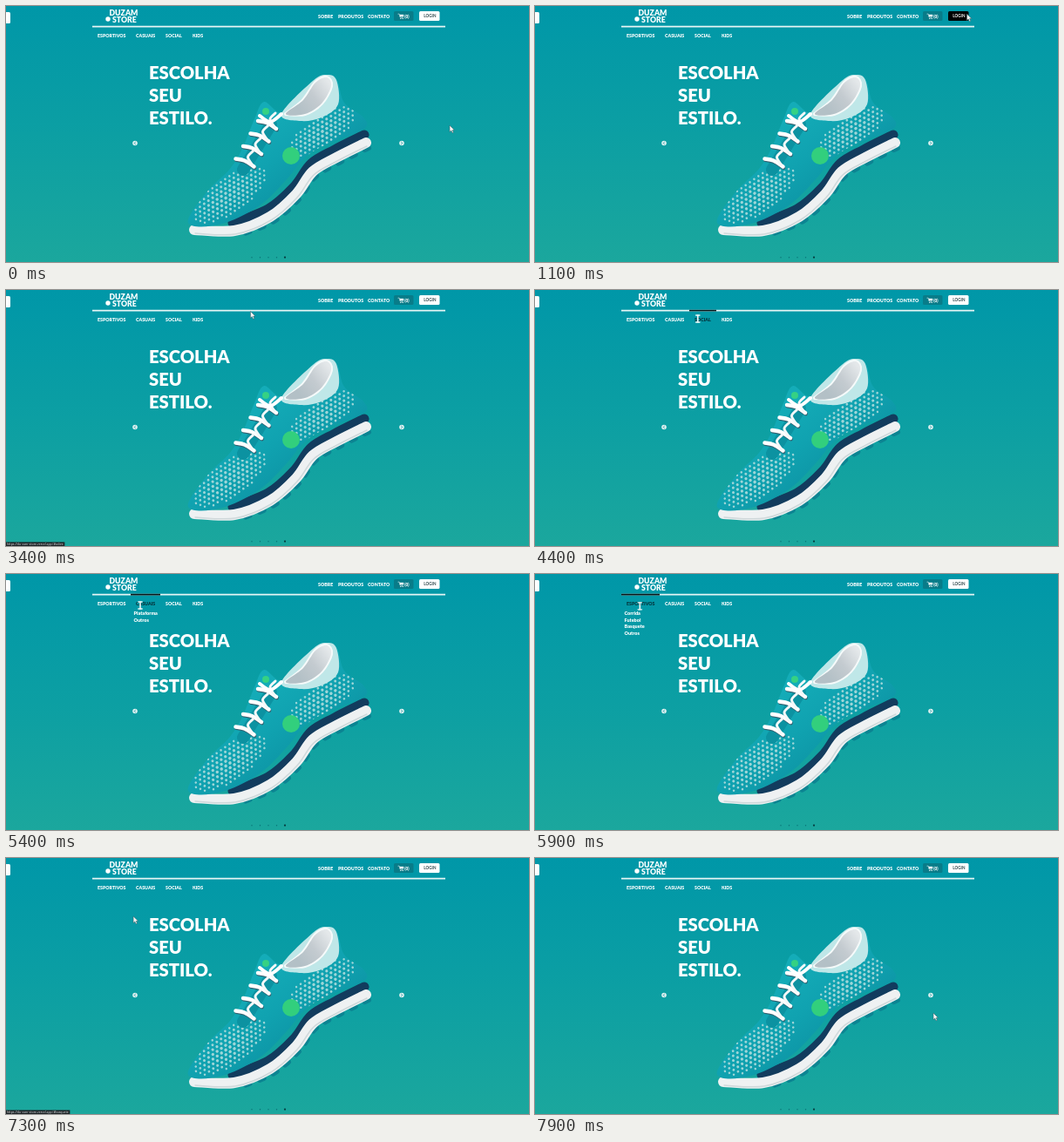
Animation, 600 px wide and 294 px high, one loop 8 s. Source, as an HTML page with a canvas:

```html
<!DOCTYPE html>
<html lang="pt">
<head>
<meta charset="utf-8">
<title>Loja de calçados</title>
<style>
html, body { margin: 0; width: 100%; height: 100%; overflow: hidden; background: #0d9fa3; }
canvas { display: block; width: 600px; height: 294px; }
</style>
</head>
<body>
<canvas id="stage"></canvas>
<script>
const W = 600, H = 294, LOOP = 8000, STEP = 100;
const FONT = 'Lato, Inter, sans-serif';
const dpr = window.devicePixelRatio || 1;
const stage = document.getElementById('stage');
const backdrop = document.createElement('canvas');

function setup(canvas) {
  canvas.width = W * dpr;
  canvas.height = H * dpr;
  const c = canvas.getContext('2d');
  c.scale(dpr, dpr);
  return c;
}
const view = setup(stage);
let g = setup(backdrop);

// Smooth curve through points given as a flat list.
function spline(flat, closed) {
  const n = flat.length / 2;
  const at = i => {
    const k = closed ? (i + n) % n : Math.max(0, Math.min(n - 1, i));
    return [flat[2 * k], flat[2 * k + 1]];
  };
  const path = new Path2D();
  path.moveTo(...at(0));
  for (let i = 0; i < (closed ? n : n - 1); i++) {
    const a = at(i - 1), b = at(i), c = at(i + 1), d = at(i + 2);
    path.bezierCurveTo(b[0] + (c[0] - a[0]) / 6, b[1] + (c[1] - a[1]) / 6,
      c[0] - (d[0] - b[0]) / 6, c[1] - (d[1] - b[1]) / 6, c[0], c[1]);
  }
  return path;
}

function blob(flat, fill) {
  const path = spline(flat, true);
  g.fillStyle = fill;
  g.fill(path);
  return path;
}

function line(flat, color, width, dx = 0, dy = 0) {
  g.save();
  g.translate(dx, dy);
  g.strokeStyle = color;
  g.lineWidth = width;
  g.lineCap = g.lineJoin = 'round';
  g.stroke(spline(flat));
  g.restore();
}

function disc(x, y, r, fill) {
  g.fillStyle = fill;
  g.beginPath();
  g.arc(x, y, r, 0, Math.PI * 2);
  g.fill();
}

function box(x, y, w, h, fill, r = 0) {
  g.fillStyle = fill;
  g.beginPath();
  g.roundRect(x, y, w, h, r);
  g.fill();
}

function label(str, x, y, size, fill = '#fff', weight = 900) {
  g.font = `${weight} ${size}px ${FONT}`;
  g.fillStyle = fill;
  g.fillText(str, x, y);
}

function blend(x0, y0, x1, y1, ...colors) {
  const grad = g.createLinearGradient(x0, y0, x1, y1);
  colors.forEach((c, i) => grad.addColorStop(i / (colors.length - 1), c));
  return grad;
}

// Staggered perforations filling a slanted ellipse, smaller towards its rim.
function holes(cx, cy, rx, ry, angle) {
  const gap = 6;
  g.save();
  g.translate(cx, cy);
  g.rotate(angle);
  for (let r = -5; r <= 5; r++)
    for (let c = -9; c <= 9; c++) {
      const x = (c + (r & 1) / 2) * gap, y = r * gap * 0.75;
      const edge = (x / rx) ** 2 + (y / ry) ** 2;
      if (edge < 1) disc(x, y, 1.8 - 0.6 * edge, '#9ed6d8');
    }
  g.restore();
}

function drawShoe() {
  // Sole: one curve from heel to toe, stroked in layers
  const sole = [413, 157, 379, 174, 352, 190, 333, 216, 303, 242, 262, 258, 216, 257];
  g.setLineDash([5, 12]);
  line(sole.slice(0, -2), '#0c8492', 6, 3, 6);
  g.setLineDash([]);
  line(sole.slice(0, -2), '#123c5e', 11, -2, -9);
  line(sole, '#eef1f2', 12);
  line(sole, '#cfd8da', 1.5, 1, 4);

  const upper = blob([209, 249, 230, 214, 257, 187, 272, 162, 285, 130, 296, 110, 318, 122, 350, 88,
    368, 79, 380, 86, 388, 111, 410, 128, 411, 141, 372, 157, 344, 173, 322, 199, 290, 230, 245, 251],
    blend(260, 150, 320, 230, '#14acb8', '#10a2b0', '#0d94a4'));
  g.save();
  g.clip(upper);
  holes(257, 217, 50, 20, -0.62);
  holes(363, 144, 46, 17, -0.6);
  g.restore();

  // Collar and lining
  blob([316, 124, 352, 86, 368, 79, 379, 85, 381, 113, 362, 128, 338, 132], '#bfe7e8');
  const lining = [321, 124, 341, 108, 355, 88, 368, 82, 373, 92, 362, 112, 343, 124];
  line([...lining, ...lining.slice(0, 2)], '#f6fafa', 4);
  blob(lining, blend(335, 118, 372, 90, '#b3c0c6', '#c4cbd0', '#e4e8ea'));

  line([304, 136, 288, 162, 272, 188], '#0c92a1', 14);
  disc(298, 121, 4, '#35d184');
  disc(327, 172, 10, '#32cf7d');

  // Laces
  for (let i = 0; i < 4; i++) {
    const x = 289 - i * 8.5, y = 132 + i * 14.5;
    const band = [x, y, x + 10, y + 2, x + 21, y + 9];
    line(band, '#35606f', 4.5, 0.6, 1.2);
    line(band, '#fff', 4.5);
    line([x + 19, y + 7, x + 14, y - 2, x + 20, y - 9], '#f4f8f8', 3);
  }
  line([316, 124, 303, 133, 291, 126], '#fff', 4);
}

function drawArrow(x, dir) {
  disc(x, 157.5, 2.8, '#dff1f1');
  line([x - dir * 0.7, 156.2, x + dir * 0.8, 157.5, x - dir * 0.7, 158.8], '#17939c', 0.8);
}

function drawBackdrop() {
  box(0, 0, W, H, blend(0, 0, 0, H, '#0097a8', '#0c9fa3', '#1ba79d'));
  box(-3, 7, 8, 13, '#fff', 1.5);

  disc(117, 15, 2.7, '#fff');
  label('DUZAM', 118.5, 11, 8.7);
  label('STORE', 122, 19, 8.7);

  box(445, 6, 22.5, 11, '#087c89', 1.5);
  line([450, 9.3, 451.4, 9.5, 452.4, 13, 455.5, 13], '#fff', 0.7);
  box(451.8, 9.8, 4.4, 2.4, '#fff');
  for (const x of [452.8, 455.2]) disc(x, 14.4, 0.6, '#fff');
  label('(0)', 457.2, 13.5, 4.6);

  drawShoe();
  ['ESCOLHA', 'SEU', 'ESTILO.'].forEach((s, i) => label(s, 164, 84.4 + i * 25.6, 20.2));
  drawArrow(148, -1);
  drawArrow(454, 1);
  for (let i = 0; i < 5; i++) disc(282 + i * 9.5, 288.7, i == 4 ? 1.1 : 0.7, i == 4 ? '#063d42' : '#0b7075');
}

const links = [['SOBRE', 358, 375], ['PRODUTOS', 381, 409], ['CONTATO', 415, 439]];
const menus = [
  { name: 'ESPORTIVOS', from: 99, to: 143, items: ['Corrida', 'Futebol', 'Basquete', 'Outros'] },
  { name: 'CASUAIS', from: 143, to: 177, items: ['Plataforma', 'Outros'] },
  { name: 'SOCIAL', from: 177, to: 208, items: [] },
  { name: 'KIDS', from: 208, to: 232, items: [] }
];
const MENU_Y = 42, ROW = 7.7;

// Resting points of the pointer: time, x, y
const stops = [
  [0, 509, 137], [550, 509, 137], [1050, 495.5, 9], [1250, 495, 9], [2300, 410, 11], [3400, 280.5, 24.5],
  [4900, 154, 36], [5400, 154, 36], [6100, 112, 37], [6600, 106.5, 69], [7150, 110, 54], [7900, 457, 178],
  [LOOP, 457, 178]
];

function pointer(t) {
  const i = stops.findIndex(s => s[0] > t);
  const a = stops[i - 1], b = stops[i];
  const u = (t - a[0]) / (b[0] - a[0]);
  const e = u * u * (3 - 2 * u);
  return [a[1] + (b[1] - a[1]) * e, a[2] + (b[2] - a[2]) * e];
}

const inside = (x, y, x0, y0, x1, y1) => x >= x0 && x < x1 && y >= y0 && y < y1;
const overLink = (x, y, [, from, to]) => inside(x, y, from - 5.5, 5, to, 19);
const overLabel = (x, y, m) => inside(x, y, m.from, 25, m.to, MENU_Y);
const overItem = (x, y, m, i) => inside(x, y, m.from, MENU_Y + i * ROW, m.to, MENU_Y + (i + 1) * ROW);

function addressAt(t) {
  if (t < 0) return;
  const [x, y] = pointer(t);
  const link = links.find(l => overLink(x, y, l));
  if (link) return link[0];
  if (inside(x, y, 445, 5, 468, 18)) return 'carrinho';
  for (const m of menus) {
    const item = m.items.find((s, i) => overItem(x, y, m, i));
    if (item) return item;
  }
}

// The address bar follows the hovered link with a delay and lingers briefly.
function drawAddress(t) {
  const name = addressAt(t - 400) || addressAt(t - 500) || addressAt(t - 600);
  if (!name) return;
  const url = 'https://du-zam-store.vercel.app/#' + name.toLowerCase();
  g.font = `400 3.8px ${FONT}`;
  box(0, 289.5, g.measureText(url).width + 2.5, 4.5, '#1d2326');
  label(url, 1, 293.1, 3.8, '#d5dadc', 400);
}

function drawPointer(x, y, beam) {
  if (beam) {
    for (const dy of [-4, 4]) line([x - 2.2, y + dy, x + 2.2, y + dy], '#eef7f7', 1.3);
    line([x, y - 4, x, y + 4], '#eef7f7', 1.6);
    return;
  }
  g.beginPath();
  [[0, 0], [0, 7.6], [1.8, 6], [3, 8.8], [4.3, 8.2], [3.2, 5.6], [5.4, 5.4]]
    .forEach(([dx, dy]) => g.lineTo(x + dx, y + dy));
  g.closePath();
  g.fillStyle = '#f4f4f4';
  g.fill();
  g.strokeStyle = '#3d5a60';
  g.lineWidth = 0.5;
  g.stroke();
}

function draw(t) {
  const [x, y] = pointer(t);
  g.drawImage(backdrop, 0, 0, W, H);

  for (const link of links)
    label(link[0], link[1], 13.7, 5.25, overLink(x, y, link) ? '#06404c' : '#fff');

  const login = inside(x, y, 473, 5, 498, 18);
  box(474, 6, 23.5, 11, login ? '#000' : '#fff', 1.5);
  label('LOGIN', 479.3, 13.4, 4.6, login ? '#fff' : '#2d464b', 700);

  box(99, 22.8, 405, 1.6, '#e6f5f5');
  let beam = false;
  for (const m of menus) {
    const onLabel = overLabel(x, y, m);
    const open = onLabel || m.items.some((s, i) => overItem(x, y, m, i));
    beam = beam || onLabel;
    label(m.name, m.from + 6, 36.1, 5.25, open ? '#06363e' : '#fff');
    if (!open) continue;
    box(m.from, 22.8, m.to - m.from, 1.6, '#04181b');
    m.items.forEach((s, i) =>
      label(s, m.from + 3.5, 47 + i * ROW, 5.5, overItem(x, y, m, i) ? '#05282e' : '#fff'));
  }
  drawAddress(t);
  drawPointer(x, y, beam);
}

drawBackdrop();
g = view;
const start = performance.now();
function tick() {
  const t = (performance.now() - start) % LOOP;
  draw(Math.floor(t / STEP) * STEP);
  requestAnimationFrame(tick);
}
tick();
</script>
</body>
</html>
```
